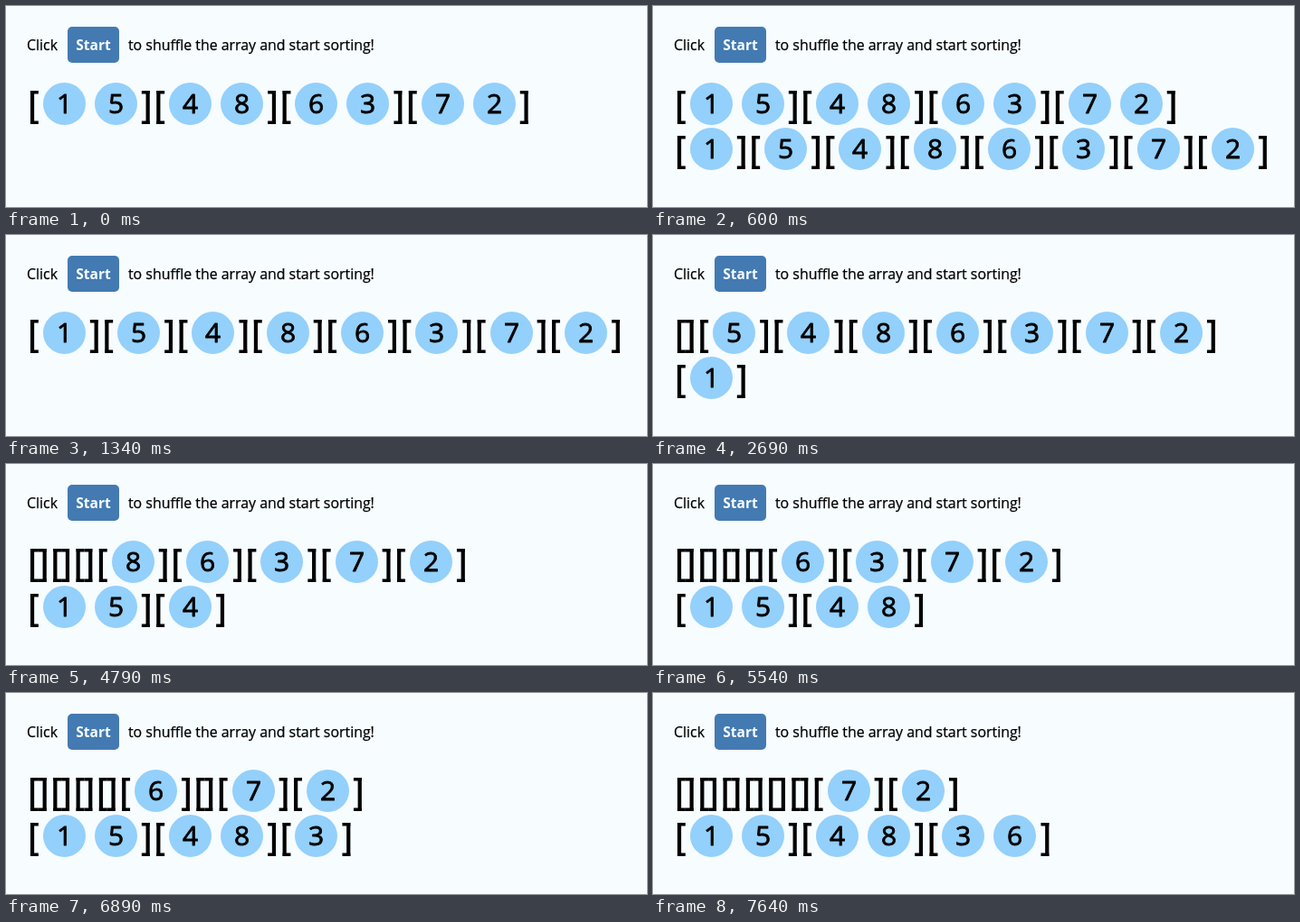
Animation, 708 px wide and 223 px high, one loop 8 s. Source, as an HTML page with a canvas:

```html
<!DOCTYPE html>
<html lang="en">
<head>
<meta charset="utf-8">
<title>Merge sort</title>
<style>
  html, body { margin: 0; width: 100%; height: 100%; overflow: hidden; background: #f7fcff; }
  canvas { display: block; width: 708px; height: 223px; }
</style>
</head>
<body>
<canvas id="stage"></canvas>
<script>
const W = 708, H = 223, LOOP = 8000;
const canvas = document.getElementById('stage');
const ctx = canvas.getContext('2d');
const scale = window.devicePixelRatio || 1;
canvas.width = W * scale;
canvas.height = H * scale;
ctx.scale(scale, scale);

// Each step: start time, upper row, lower row. Groups are split by "|".
const steps = [
  [0, '15|48|63|72', null],
  [600, '15|48|63|72', '1|5|4|8|6|3|7|2'],
  [1340, '1|5|4|8|6|3|7|2', null],
  [2690, '|5|4|8|6|3|7|2', '1'],
  [3440, '||4|8|6|3|7|2', '15'],
  [4790, '|||8|6|3|7|2', '15|4'],
  [5540, '||||6|3|7|2', '15|48'],
  [6890, '||||6||7|2', '15|48|3'],
  [7640, '||||||7|2', '15|48|36']
];

const LEFT = 23.2, BRACKET = 12.65, CELL = 57, MARGIN = 5, RADIUS = 23.5;
const ROW_Y = 108.5, ROW_GAP = 50;
const FACE = '"Open Sans", "Noto Sans", sans-serif';

// weight is the width of an outline that thickens the letters.
function label(text, x, y, font, color, { align = 'left', weight = 0 } = {}) {
  ctx.font = `${font} ${FACE}`;
  ctx.fillStyle = ctx.strokeStyle = color;
  ctx.textAlign = align;
  ctx.fillText(text, x, y);
  if (!weight) return;
  ctx.lineWidth = weight;
  ctx.lineJoin = 'round';
  ctx.strokeText(text, x, y);
}

// dir is 1 for "[" and -1 for "]"; x is the outer edge of the bar.
function bracket(x, y, dir) {
  const top = y - 14.5, height = 37, arm = 8.9, bar = 4.2, thick = 3.5;
  const rect = (w, ry, h) => ctx.fillRect(dir > 0 ? x : x - w, ry, w, h);
  ctx.fillStyle = '#000';
  rect(bar, top, height);
  rect(arm, top, thick);
  rect(arm, top + height - thick, thick);
}

function ball(left, y, digit) {
  const x = Math.round(left) + RADIUS;
  ctx.fillStyle = '#93d0fb';
  ctx.beginPath();
  ctx.arc(x, y, RADIUS, 0, Math.PI * 2);
  ctx.fill();
  label(digit, x, y + 10.3, '400 30px', '#000', { align: 'center', weight: 0.8 });
}

function row(groups, y) {
  let x = LEFT;
  for (const group of groups.split('|')) {
    bracket(x + 3.75, y, 1);
    x += BRACKET;
    for (const digit of group) {
      ball(x + MARGIN, y, digit);
      x += CELL;
    }
    x += BRACKET;
    bracket(x - 3.75, y, -1);
  }
}

function header() {
  const plain = (text, x) => label(text, x, 49, '400 15.9px', '#000', { weight: 0.25 });
  plain('Click', 23);
  ctx.fillStyle = '#437ab1';
  ctx.beginPath();
  ctx.roundRect(68, 23, 57, 40, 5);
  ctx.fill();
  label('Start', 96.5, 49, '700 15.5px', '#f7fcff', { align: 'center' });
  plain('to shuffle the array and start sorting!', 135);
}

function draw(now) {
  const t = now % LOOP;
  const [, upper, lower] = steps.findLast(([start]) => t >= start);
  ctx.fillStyle = '#f7fcff';
  ctx.fillRect(0, 0, W, H);
  header();
  row(upper, ROW_Y);
  if (lower !== null) row(lower, ROW_Y + ROW_GAP);
}

const origin = performance.now();
function tick() {
  draw(performance.now() - origin);
  requestAnimationFrame(tick);
}
tick();
</script>
</body>
</html>
```
